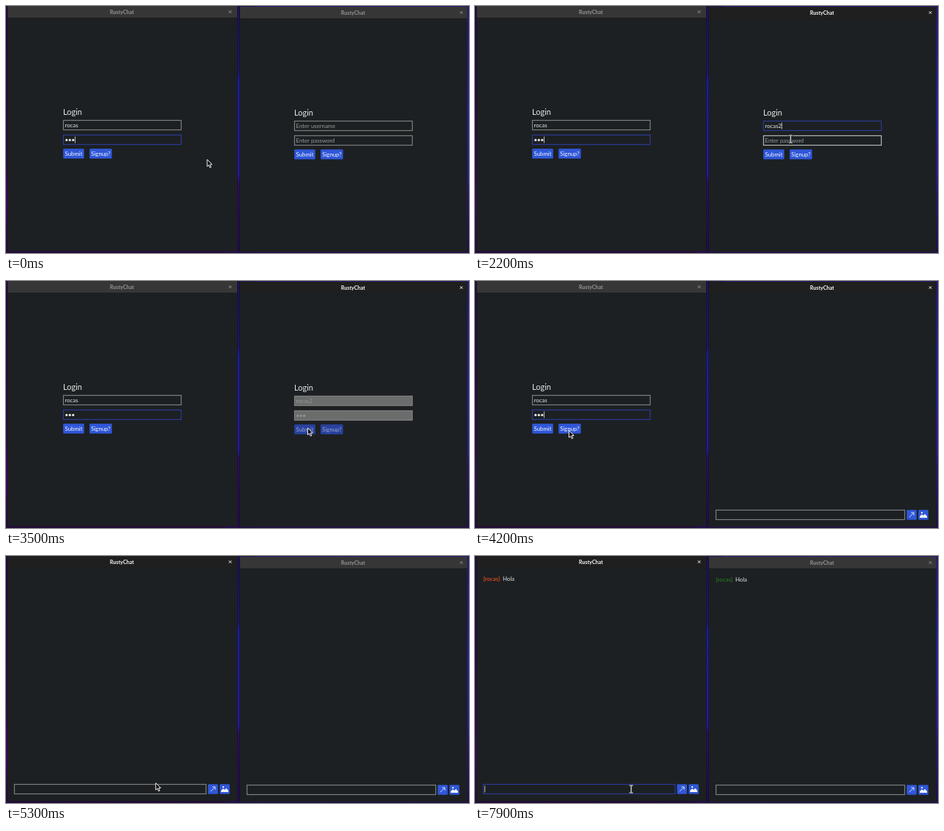
Recreate the animation shown at these times as an HTML page with a canvas. Size 633 by 338 pixels, loop 8000 ms.

```html
<!DOCTYPE html>
<html lang="en">
<head>
<meta charset="utf-8">
<title>Chat login</title>
<style>
  html, body { margin: 0; width: 633px; height: 338px; overflow: hidden; background: #1d2023; }
  canvas { display: block; }
</style>
</head>
<body>
<canvas id="stage" width="633" height="338"></canvas>
<script>
const ctx = document.getElementById('stage').getContext('2d');
const LOOP = 8000, STEP = 100;
const UI = 'Lato, sans-serif';
const BG = '#1d2023', BLUE = '#2f57d8', LINE = '#7b7e7c', FOCUS = '#2a3a94', TEXT = '#e6e8e8';
const USER = 'rocas';

// Pointer stops: time, x, y
const PATH = [
  [0, 275, 210], [100, 275, 210], [600, 431.5, 160], [1900, 431.5, 160],
  [2200, 431.5, 182], [2800, 431.5, 182], [3300, 412.5, 201], [3800, 412.5, 201],
  [4300, 95.5, 205], [4800, 95.5, 205], [5400, 213.5, 319], [LOOP, 213.5, 319]
];

const LEFT = {
  x: 2.5, y: 0, w: 313.5, bottom: 335.5, mid: 158.5, formX: 78, chatX: 11, chatEnd: 306,
  submit: 4400, chat: 4800, message: 6900, nameColor: '#d9481f'
};
const RIGHT = {
  x: 320, y: 1, w: 310.7, bottom: 336.5, mid: 474.5, formX: 394, chatX: 329, chatEnd: 620,
  submit: 3400, chat: 3800, message: 7000, nameColor: '#22701f'
};

const clamp = v => Math.max(0, Math.min(1, v));
const mix = (a, b, k) => a + (b - a) * k;
const gray = v => `rgb(${v},${v},${v})`;
const blink = (t, since) => (t - since) % 1000 < 500;

function rect(x, y, w, h, color) {
  ctx.fillStyle = color;
  ctx.fillRect(x, y, w, h);
}

function text(str, x, y, color, size = 7.8, weight = 400, align = 'left') {
  ctx.font = `${weight} ${size}px ${UI}`;
  ctx.textAlign = align;
  ctx.fillStyle = color;
  ctx.fillText(str, x, y);
  return ctx.measureText(str).width;
}

function poly(points, fill, stroke, width = 1, close = true) {
  ctx.beginPath();
  points.forEach(([x, y]) => ctx.lineTo(x, y));
  if (close) ctx.closePath();
  if (fill) { ctx.fillStyle = fill; ctx.fill(); }
  if (stroke) { ctx.strokeStyle = stroke; ctx.lineWidth = width; ctx.stroke(); }
}

function dot(x, y, r, color) {
  ctx.fillStyle = color;
  ctx.beginPath();
  ctx.arc(x, y, r, 0, Math.PI * 2);
  ctx.fill();
}

function pointerAt(t) {
  const i = Math.max(1, PATH.findIndex(p => p[0] > t));
  const [a, b] = [PATH[i - 1], PATH[i]];
  const k = (t - a[0]) / (b[0] - a[0]);
  const e = k * k * (3 - 2 * k);
  return { x: mix(a[1], b[1], e), y: mix(a[2], b[2], e), beam: false };
}

// Letters typed so far, with the time of the latest key press or focus.
function typing(str, t, start, gap, focused) {
  const n = Math.max(0, Math.min(str.length, Math.floor((t - start) / gap) + 1));
  return { value: str.slice(0, n), since: n ? start + (n - 1) * gap : focused };
}

function input(x, y, w, o, pointer) {
  const over = pointer.x > x && pointer.x < x + w && pointer.y > y && pointer.y < y + 14;
  if (over) pointer.beam = true;
  rect(x, y, w, 14, o.disabled ? '#6b6d6c' : BG);
  ctx.lineWidth = 1.2;
  ctx.strokeStyle = o.disabled ? '#7d7f7d' : o.focused ? FOCUS : over ? '#b4b6b4' : LINE;
  ctx.strokeRect(x + .5, y + .5, w - 1, 13);
  const color = o.disabled ? '#939594' : TEXT;
  let width = 0;
  if (!o.value) {
    text(o.hint || '', x + 2.5, y + 10.2, '#989b9a');
  } else if (o.secret) {
    width = o.value.length * 4.5;
    for (let i = 0; i < o.value.length; i++) dot(x + 4.8 + i * 4.5, y + 7.4, 1.6, color);
  } else {
    width = text(o.value, x + 2.5, y + 10.2, color);
  }
  if (o.focused && o.caret) rect(Math.round(x + 2 + width), y + 2.5, 1, 9, '#b4b6b6');
}

function button(label, x, y, w, disabled) {
  ctx.fillStyle = disabled ? '#28429f' : BLUE;
  ctx.beginPath();
  ctx.roundRect(x + .2, y + .2, w - .4, 13.6, 1.2);
  ctx.fill();
  if (label) text(label, x + w / 2, y + 10.2, disabled ? '#98a4cc' : '#f4f6fc', 7.8, 400, 'center');
}

function login(win, t, form, pointer) {
  const { formX: x, y } = win;
  const disabled = t >= win.submit;
  text('Login', x, y + 149, TEXT, 11);
  input(x, y + 156, 162, { hint: 'Enter username', disabled, ...form.name }, pointer);
  input(x, y + 176, 162, { hint: 'Enter password', secret: true, disabled, ...form.pass }, pointer);
  button('Submit', x, y + 195, 29, disabled);
  button('Signup?', x + 36, y + 195, 31, disabled);
}

function chat(win, t, draft, pointer) {
  const { chatX: x, chatEnd: end, y } = win;
  if (t >= win.message) {
    text(`[${USER}]`, x + .3, y + 33.5, win.nameColor, 7.8, 700);
    text('Hola', x + 27, y + 33.5, TEXT);
  }
  input(x, y + 312, end - 32 - x, draft, pointer);
  const top = y + 312, send = end - 30, pic = end - 14;
  button('', send, top, 14);
  poly([[send + 3.7, top + 10.2], [send + 9.7, top + 4.2]], null, '#e8edfb', .9, false);
  poly([[send + 6.2, top + 4], [send + 10, top + 4], [send + 10, top + 7.8]], null, '#e8edfb', .9, false);
  button('', pic, top, 14);
  poly([[pic + 2, top + 11], [pic + 2, top + 9], [pic + 5, top + 6.3], [pic + 7, top + 8],
    [pic + 9, top + 5.8], [pic + 12, top + 9], [pic + 12, top + 11]], '#f4f6fc');
  dot(pic + 5, top + 4.1, 1.2, '#f4f6fc');
}

function frame(win, focus) {
  const { x, y, w, mid } = win;
  rect(x, y, w, win.bottom - y, BG);
  rect(x, y, w, 16, gray(Math.round(mix(54, 31, focus))));
  rect(x, y + 16, w, .6, '#191b1d');
  const color = gray(Math.round(mix(150, 250, focus)));
  text('RustyChat', mid, y + 10.7, color, 7.1, 700, 'center');
  const cx = mid + 148, cy = y + 8;
  poly([[cx - 1.7, cy - 1.7], [cx + 1.7, cy + 1.7]], null, color, 1, false);
  poly([[cx - 1.7, cy + 1.7], [cx + 1.7, cy - 1.7]], null, color, 1, false);
}

function wallpaper() {
  const strip = (x, w, stops) => {
    const g = ctx.createLinearGradient(0, 0, 0, 338);
    stops.forEach(([at, color]) => g.addColorStop(at, color));
    rect(x, 0, w, 338, g);
  };
  strip(0, 300, [[0, '#1f0b3a'], [.6, '#2a0a42'], [.8, '#3a0952'], [1, '#220b38']]);
  strip(300, 40, [[0, '#1c1450'], [.27, '#1c1666'], [.3, '#1d1c98'], [.68, '#241a9a'], [.72, '#2c0f58'], [1, '#220d48']]);
  strip(340, 293, [[0, '#231c78'], [.4, '#2820a8'], [.68, '#2a1c9c'], [.75, '#2c1478'], [1, '#220f4c']]);
  // Window shadows darken the gap on both sides.
  rect(316, 0, 1, 338, 'rgba(18,16,28,.55)');
  rect(319, 0, 1, 338, 'rgba(18,16,28,.55)');
}

function drawPointer({ x, y, beam }) {
  if (beam) {
    for (const [color, grow] of [['#33363a', .7], ['#d2d4d4', 0]]) {
      rect(x - .6 - grow, y - 5 - grow, 1.2 + 2 * grow, 10 + 2 * grow, color);
      for (const end of [-5.5, 4.5]) rect(x - 2.5 - grow, y + end - grow, 5 + 2 * grow, 1 + 2 * grow, color);
    }
    return;
  }
  const shape = [[0, 0], [0, 9.6], [2.2, 7.6], [3.8, 11.2], [5.4, 10.5], [3.8, 7], [6.8, 6.8]];
  poly(shape.map(([dx, dy]) => [x + dx, y + dy]), '#111', '#f2f2f2', 1);
}

function draw(t) {
  const pointer = pointerAt(t);
  const toLeft = clamp((t - 4400) / 200);
  const rightFocus = t < 4400 ? clamp((t - 500) / 200) : 1 - toLeft;
  const leftFocus = t < 4400 ? 0 : Math.max(.85, toLeft);

  wallpaper();
  frame(LEFT, leftFocus);
  frame(RIGHT, rightFocus);

  if (t < LEFT.chat) {
    const active = t < LEFT.submit;
    login(LEFT, t, {
      name: { value: USER },
      pass: { value: '123', focused: active, caret: blink(t, 0) }
    }, pointer);
  } else {
    const sent = t >= LEFT.message;
    const key = t < 6500 ? typing('H', t, 6200, 100, 5600) : typing('Hola', t, 6400, 100, 5600);
    const since = sent ? LEFT.message : key.since;
    chat(LEFT, t, { value: sent ? '' : key.value, focused: t >= 5600, caret: blink(t, since) }, pointer);
  }

  if (t < RIGHT.chat) {
    const name = typing(USER + '2', t, 1100, 140, 600);
    const pass = typing('123', t, 2500, 100, 2300);
    const active = t < RIGHT.submit;
    login(RIGHT, t, {
      name: { value: name.value, focused: t >= 600 && t < 2300, caret: blink(t, name.since) },
      pass: { value: pass.value, focused: t >= 2300 && active, caret: blink(t, pass.since) }
    }, pointer);
  } else {
    chat(RIGHT, t, { value: '' }, pointer);
  }

  drawPointer(pointer);
}

const origin = performance.now();
function tick() {
  const t = (performance.now() - origin) % LOOP;
  draw(Math.floor(t / STEP) * STEP);
  requestAnimationFrame(tick);
}
tick();
</script>
</body>
</html>
```
